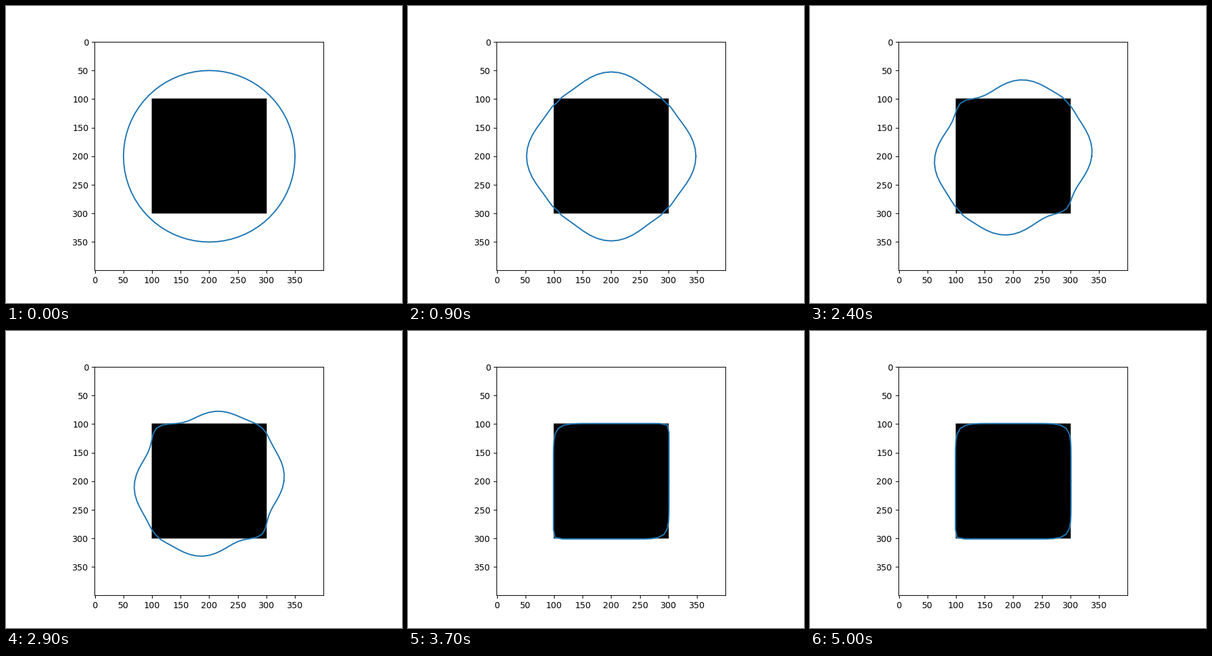
Write a matplotlib script that moves like this. It is 640 px wide and 480 px high and loops after 5.1 s.

```python
import numpy as np
import matplotlib.pyplot as plt
from matplotlib.animation import FuncAnimation

SIZE = 400
CENTER = 200
START = 150               # radius of the first circle
HALF = 101                # half side of the final contour
FRAMES, INTERVAL = 51, 100

# Bulge over each side: direction, final drift (degrees), time it is gone (ms)
BULGES = [(0, -4, 3580), (90, 7, 3580), (180, -5, 3580), (270, 8, 3150)]

theta = np.linspace(0, 360, 73)
cos, sin = np.cos(np.radians(theta)), np.sin(np.radians(theta))
bottom_left = (theta > 90) & (theta < 180)
top_right = (theta > 270) & (theta < 360)


def ease(t, begin, end):
    u = np.clip((t - begin) / (end - begin), 0, 1)
    return u * u * (3 - 2 * u)


def rounded_square(t):
    """Superellipse whose power, the sharpness, differs between corners."""
    tighten = ease(t, 2900, 3700)
    relax = ease(t, 3700, 5000)
    power = 8 + 18 * (tighten * bottom_left + (tighten - relax) * top_right)
    return HALF / (abs(cos) ** power + abs(sin) ** power) ** (1 / power)


def bulge(t, direction, drift, gone):
    """A hump that sinks ever faster, narrows and drifts sideways."""
    level = (1 - min(t / gone, 1) ** 1.7) ** 0.4
    width = 28 + 26 * level
    middle = direction + drift * ease(t, 800, 2700)
    offset = (theta - middle + 180) % 360 - 180
    phase = np.clip(offset / width, -1, 1) * np.pi / 2
    return (START - HALF) * level * np.cos(phase) ** 2


def contour(t):
    humps = np.max([bulge(t, *b) for b in BULGES], axis=0)
    caught = min(t / 900, 1)
    r = START + caught * (rounded_square(t) + humps - START)
    return CENTER + r * cos, CENTER + r * sin


image = np.ones((SIZE, SIZE))
image[100:301, 100:301] = 0

fig, ax = plt.subplots(figsize=(6.4, 4.8), dpi=100)
ax.imshow(image, cmap="gray", vmin=0, vmax=1)
line, = ax.plot([], [], color="tab:blue", lw=1.5)
ax.set_xlim(-0.5, SIZE - 0.5)
ax.set_ylim(SIZE - 0.5, -0.5)
ax.set_xticks(range(0, SIZE, 50))
ax.set_yticks(range(0, SIZE, 50))


def update(frame):
    line.set_data(*contour(frame * INTERVAL))
    return line,


anim = FuncAnimation(fig, update, frames=FRAMES, interval=INTERVAL,
                     repeat=True, repeat_delay=0)
plt.show()
```
